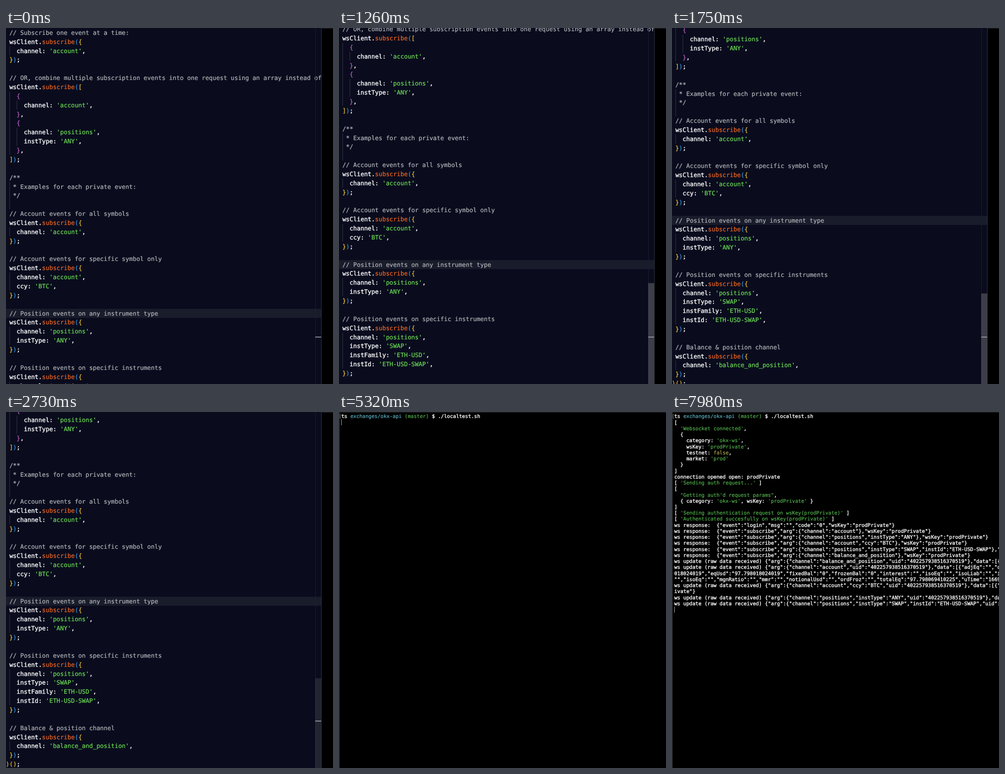
Recreate the animation shown at these times as an HTML page. Size 717x781 px, loop 8000 ms.

```html
<!DOCTYPE html>
<html lang="en">
<head>
<meta charset="utf-8">
<title>Editor and terminal</title>
<style>
  html, body { margin: 0; width: 100%; height: 100%; overflow: hidden; background: #000; }
  svg { display: block; width: 717px; height: 781px; }
  text {
    font-family: "DejaVu Sans Mono", monospace;
    white-space: pre;
    text-rendering: geometricPrecision;
    font-variant-ligatures: none;
    stroke-width: .2px;
  }
  .code text { font-size: 13.22px; }
  .term text { font-size: 11px; }
  .bold { stroke-width: .4px; }
</style>
</head>
<body>
<svg viewBox="0 0 717 781">
  <defs><clipPath id="pane"><rect width="692" height="781"/></clipPath></defs>
  <g class="term">
    <rect width="717" height="781" fill="#000"/>
    <rect width="717" height="1" fill="#2c2c2c"/>
    <rect width="1" height="781" fill="#484848"/>
    <path id="mark" d="M4.5 5H2.5V14H4.5" fill="none" stroke="#777"/>
    <g id="rows"></g>
    <rect id="cursor" width="1" height="13" fill="#b4b4b4"/>
  </g>
  <g class="code" id="editor" clip-path="url(#pane)">
    <rect width="692" height="781" fill="#0a0c1e"/>
    <g id="doc"></g>
    <rect x="678" width="1" height="781" fill="#1b1e2f"/>
    <rect id="thumb" x="678" width="13" height="232" fill="#7d7d7d"/>
    <rect x="678" y="677.2" width="13" height="1.7" fill="#a2a3a7"/>
    <rect x="691" width="1" height="781" fill="#33363f"/>
  </g>
</svg>
<script>
const LOOP = 8000, STEP = 70;
const $ = id => document.getElementById(id);

function add(parent, tag, attrs, content) {
  const el = document.createElementNS('http://www.w3.org/2000/svg', tag);
  for (const key in attrs) el.setAttribute(key, attrs[key]);
  if (content) el.textContent = content;
  parent.appendChild(el);
  return el;
}

// parts: list of [string, colour]
function addLine(parent, x, y, parts) {
  const line = add(parent, 'text', { x, y });
  for (const [str, fill] of parts) {
    add(line, 'tspan', { fill, stroke: fill, class: fill === '#fff' ? 'bold' : '' }, str);
  }
  return line;
}

/* Editor */
const ROW = 19.865, COL = 7.96, LEFT = 7.4;
const call = (title, ...body) =>
  [`// ${title}`, 'wsClient.subscribe({', ...body.map(s => `  ${s},`), '});', ''];
const account = "channel: 'account'", positions = "channel: 'positions'";
const source = [
  ...call('Subscribe one event at a time:', account),
  '// OR, combine multiple subscription events into one request using an array instead of',
  'wsClient.subscribe([',
  '  {', `    ${account},`, '  },',
  '  {', `    ${positions},`, "    instType: 'ANY',", '  },',
  ']);', '',
  '/**', ' * Examples for each private event:', ' */', '',
  ...call('Account events for all symbols', account),
  ...call('Account events for specific symbol only', account, "ccy: 'BTC'"),
  ...call('Position events on any instrument type', positions, "instType: 'ANY'"),
  ...call('Position events on specific instruments', positions, "instType: 'SWAP'",
    "instFamily: 'ETH-USD'", "instId: 'ETH-USD-SWAP'"),
  ...call('Balance & position channel', "channel: 'balance_and_position'").slice(0, -1),
  '})();'
];

function codeColour(token, line) {
  if (token[0] === "'") return '#70e456';
  if (token === 'subscribe') return '#fb6a20';
  if (/[{}[\]]/.test(token)) return /^ +[{}]/.test(line) ? '#c565cf' : '#f6cb2d';
  if (/[()]/.test(token)) return line === '})();' ? '#f6cb2d' : '#2f9df0';
  return '#fff';
}

function buildEditor() {
  const doc = $('doc');
  add(doc, 'rect', { y: 31 * ROW + .3, width: 691, height: ROW, fill: '#191c2b' });
  const guides = [[0, 2, 2], [0, 7, 13], [1, 8, 8], [1, 11, 12], [0, 17, 19], [0, 22, 22],
    [0, 27, 28], [0, 33, 34], [0, 39, 42], [0, 47, 47]];
  for (const [level, from, to] of guides) {
    add(doc, 'rect', { x: 7.5 + level * 2 * COL, y: from * ROW + .3, width: 1,
      height: (to - from + 1) * ROW, fill: '#373a49' });
  }
  source.forEach((line, i) => {
    const parts = /^( ?\*|\/)/.test(line)
      ? [[line, '#b8babd']]
      : (line.match(/'[^']*'|subscribe|[{}[\]()]|[^'{}[\]()]+?(?=subscribe|['{}[\]()]|$)/g) || [])
        .map(t => [t, codeColour(t, line)]);
    const x = line === '})();' ? LEFT - 2 * COL : LEFT;
    addLine(doc, x, 14.8 + i * ROW, parts);
  });
}

/* Terminal */
const PITCH = 13.24, CHAR = 6.622;
const uid = '"uid":"402257938516370519"';
const reply = s => `ws response:  {"event":${s},"wsKey":"prodPrivate"}`;
const sub = s => reply(`"subscribe","arg":{"channel":${s}}`);
const update = s => `ws update (raw data received) {"arg":{"channel":${s},${uid}},"data":[{"`;
const output = [
  '[', "  'Websocket connected',", '  {', "    category: 'okx-ws',", "    wsKey: 'prodPrivate',",
  '    testnet: false,', "    market: 'prod'", '  }', ']',
  'connection opened open: prodPrivate',
  "[ 'Sending auth request...' ]",
  '[', '  "Getting auth\'d request params",', "  { category: 'okx-ws', wsKey: 'prodPrivate' }", ']',
  "[ 'Sending authentication request on wsKey(prodPrivate)' ]",
  "[ 'Authenticated succesfully on wsKey(prodPrivate)' ]",
  reply('"login","msg":"","code":"0"'),
  sub('"account"'),
  sub('"positions","instType":"ANY"'),
  sub('"account","ccy":"BTC"'),
  sub('"positions","instType":"SWAP","instId":"ETH-USD-SWAP"'),
  sub('"balance_and_position"'),
  update('"balance_and_position"'),
  update('"account"') + 'adjEq":"","details',
  '018024019","eqUsd":"97.798018024019","fixedBal":"0","frozenBal":"0","interest":"","isoEq":"","isoLiab":"","isoUpl',
  '"","isoEq":"","mgnRatio":"","mmr":"","notionalUsd":"","ordFroz":"","totalEq":"97.798069410225","uTime":"16690',
  update('"account","ccy":"BTC"'),
  'ivate"}',
  update('"positions","instType":"ANY"'),
  update('"positions","instType":"SWAP","instId":"ETH-USD-SWAP"')
];

const GREEN = '#54b84f';
function termColour(token) {
  if (token === 'false') return '#b0a850';
  return /^['"]/.test(token) ? GREEN : '#fff';
}

let command, lines;
function buildTerminal() {
  const rows = $('rows');
  addLine(rows, 5, 13.4, [['ts ', '#fff'], ['exchanges/okx-api ', '#5cb6ca'],
    ['(master) ', GREEN], ['$ ', '#fff']]);
  command = addLine(rows, 5 + 32 * CHAR, 13.4, [['./localtest.sh', '#fff']]);
  lines = output.map((line, i) => {
    const parts = i < 17
      ? line.match(/"[^"]*"|'[^']*'|false|[^'"]+?(?=false|['"]|$)/g).map(t => [t, termColour(t)])
      : [[line, '#fff']];
    return addLine(rows, 5, 13.4 + (i + 1) * PITCH, parts);
  });
}

/* Motion */
const scrollKeys = [[840, 0], [910, 14], [980, 36], [1260, 107], [1540, 168.5], [1680, 197], [1820, 211]];
const thumbKeys = [[840, 0], [980, .29], [1050, .43], [2400, .43], [2730, .22], [3010, .05]];
const editorKeys = [[2800, 1], [2870, .7], [2940, .35], [3010, 0]];
const printed = [[7140, 16], [7490, 18], [7770, 23], [7910, 31]];

function at(keys, t) {
  if (t <= keys[0][0]) return keys[0][1];
  for (let i = 1; i < keys.length; i++) {
    const [t0, a] = keys[i - 1], [t1, b] = keys[i];
    if (t < t1) return a + (b - a) * (t - t0) / (t1 - t0);
  }
  return keys[keys.length - 1][1];
}

const show = (el, on) => el.setAttribute('visibility', on ? 'visible' : 'hidden');

function draw(ms) {
  const t = Math.floor((ms % LOOP) / STEP) * STEP;

  const scroll = at(scrollKeys, t);
  $('doc').setAttribute('transform', `translate(0 ${-scroll})`);
  $('thumb').setAttribute('y', 534.6 + scroll * .2342);
  $('thumb').setAttribute('opacity', at(thumbKeys, t));
  $('editor').setAttribute('opacity', at(editorKeys, t));

  const typed = t >= 3710, entered = t >= 4550;
  const count = printed.reduce((n, [start, rows]) => t >= start ? rows : n, 0);
  show(command, typed);
  show($('mark'), entered);
  lines.forEach((line, i) => show(line, i < count));
  const col = entered ? 0 : typed ? 47 : 32;
  const row = entered ? count + 1 : 0;
  $('cursor').setAttribute('x', Math.round(5 + col * CHAR));
  $('cursor').setAttribute('y', Math.round(3 + row * PITCH));
}

buildEditor();
buildTerminal();
const start = performance.now();
function tick() {
  draw(performance.now() - start);
  requestAnimationFrame(tick);
}
draw(0);
requestAnimationFrame(tick);
</script>
</body>
</html>
```
